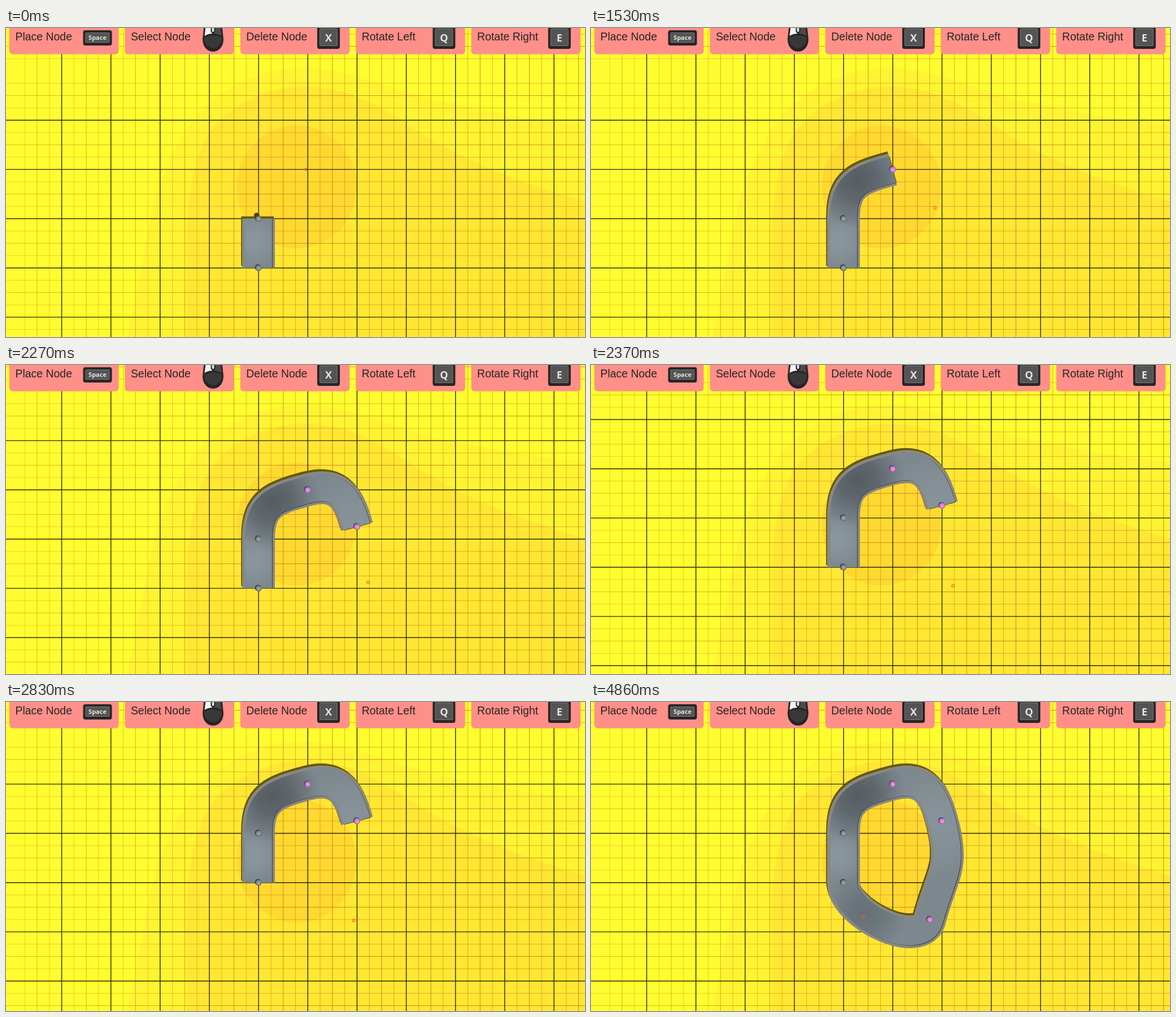
Recreate the animation shown at these times as an HTML page with a canvas. Size 1025 px wide and 547 px high, loop 5370 ms.

```html
<!DOCTYPE html>
<html>
<head>
<meta charset="utf-8">
<style>
html, body { margin: 0; width: 100%; height: 100%; overflow: hidden; background: #fffd2f; }
canvas { display: block; }
</style>
</head>
<body>
<canvas id="stage" width="1025" height="547"></canvas>
<script>
const ctx = document.getElementById('stage').getContext('2d');
const W = 1025, H = 547, LOOP = 5370, CELL = 87.15;

// [time, x, y]
const CURSOR = [
  [280, 531, 250], [740, 552, 269], [840, 556, 273], [1300, 599, 309], [1400, 605, 314],
  [1860, 619, 329], [2120, 631, 347], [2270, 641, 385], [2370, 641, 391], [2500, 635, 394],
  [2910, 611, 385], [3060, 607, 385], [3520, 555, 385], [3600, 543, 383], [3650, 532, 382],
  [3880, 482, 381.5], [4030, 481.5, 381], [4490, 482, 380.5]
];
const SCROLL = [[2170, 0], [2270, -29], [2420, -85], [2500, -99], [2640, -105]];

// Each node has a heading in degrees, a handle length and the time it appears
const NODES = [
  { x: 447, y: 424.7, angle: -90, pull: .35, at: 0 },
  { x: 447, y: 337.4, angle: -90, pull: .4, at: 0 },
  { x: 534, y: 250.3, angle: -15, pull: .5, at: 380, pink: true },
  { x: 621.3, y: 315.5, angle: 75, pull: .5, at: 1630, pink: true },
  { x: 599.7, y: 490, angle: 105, pull: .5, at: 2840, pink: true }
];
const CLOSE_AT = 4860;

function sample(keys, t) {
  const next = keys.findIndex(k => k[0] > t);
  if (next === 0) return keys[0].slice(1);
  if (next < 0) return keys[keys.length - 1].slice(1);
  const a = keys[next - 1], b = keys[next];
  const u = (t - a[0]) / (b[0] - a[0]);
  return a.slice(1).map((v, i) => v + (b[i + 1] - v) * u);
}

function circle(x, y, r, fill) {
  ctx.beginPath();
  ctx.arc(x, y, r, 0, 7);
  ctx.fillStyle = fill;
  ctx.fill();
}

function box(x, y, w, h, r, fill) {
  ctx.beginPath();
  ctx.roundRect(x, y, w, h, r);
  ctx.fillStyle = fill;
  ctx.fill();
}

function radial(x, y, r, rgb, alpha) {
  const g = ctx.createRadialGradient(x, y, 0, x, y, r);
  g.addColorStop(0, `rgba(${rgb},${alpha})`);
  g.addColorStop(.4, `rgba(${rgb},${alpha * .75})`);
  g.addColorStop(1, `rgba(${rgb},0)`);
  return g;
}

const outerGlow = new Path2D(`M215 547C232 470 246 380 262 310C280 250 300 205 330 165
  C370 115 440 70 530 70C600 72 680 108 760 128C850 148 930 162 1025 172V547Z`);
const innerGlow = new Path2D(`M320 547V365C322 290 335 225 360 185C400 130 470 104 530 104
  C610 104 670 143 720 177C790 222 880 265 1025 307V547Z`);

function background() {
  ctx.fillStyle = '#fffd2f';
  ctx.fillRect(0, 0, W, H);
  ctx.fillStyle = '#fff431';
  ctx.fill(outerGlow);
  ctx.fillStyle = '#ffe732';
  ctx.fill(innerGlow);
  ctx.beginPath();
  ctx.ellipse(514.5, 281.5, 106, 109, 0, 0, 7);
  ctx.fillStyle = '#ffd92f';
  ctx.fill();
}

function lines(step, skip, scroll, style, width) {
  ctx.beginPath();
  const draw = (origin, limit, vertical) => {
    for (let i = -8; i < 60; i++) {
      if (i % skip === 0) continue;
      const p = origin + i * step;
      if (p < 0 || p > limit) continue;
      ctx.moveTo(vertical ? p : 0, vertical ? 0 : p);
      ctx.lineTo(vertical ? p : W, vertical ? H : p);
    }
  };
  draw(11.4, W, true);
  draw(76.1 + scroll % CELL, H, false);
  ctx.strokeStyle = style;
  ctx.lineWidth = width;
  ctx.stroke();
}

function fade(from, to) {
  const g = ctx.createLinearGradient(0, 0, 600, 0);
  g.addColorStop(0, `rgba(190,85,10,${from})`);
  g.addColorStop(1, `rgba(170,80,10,${to})`);
  return g;
}

function grid(scroll) {
  lines(CELL / 4, 2, scroll, fade(.26, .4), 1);
  lines(CELL / 2, 2, scroll, fade(.4, .62), 1);
  lines(CELL, Infinity, scroll, '#2b2a14', 1.4);
}

function trackPath(nodes, closed) {
  const path = new Path2D();
  path.moveTo(nodes[0].x, nodes[0].y);
  const join = (a, b) => {
    const h = Math.hypot(b.x - a.x, b.y - a.y) * b.pull;
    const p = a.angle * Math.PI / 180, q = b.angle * Math.PI / 180;
    path.bezierCurveTo(a.x + h * Math.cos(p), a.y + h * Math.sin(p),
      b.x - h * Math.cos(q), b.y - h * Math.sin(q), b.x, b.y);
  };
  for (let i = 1; i < nodes.length; i++) join(nodes[i - 1], nodes[i]);
  if (closed) {
    join(nodes[nodes.length - 1], nodes[0]);
    path.closePath();
  }
  return path;
}

function track(nodes, closed) {
  const path = trackPath(nodes, closed);
  const layer = (style, width, dx = 0, dy = 0) => {
    ctx.save();
    ctx.translate(dx, dy);
    ctx.strokeStyle = style;
    ctx.lineWidth = width;
    ctx.stroke(path);
    ctx.restore();
  };
  layer('#625a0c', 58, -1.8, -3.8);
  layer('#8a8782', 58);
  layer('#35383a', 48, .9, .6);
  layer('#7d888e', 48);
  if (nodes.length > 2) layer(radial(472, 270, 85, '78,84,90', .85), 48);
  if (closed) layer(radial(485, 480, 75, '92,101,108', .7), 48);
  layer(radial(437, 377, 48, '146,161,166', .6), 48);
  layer(radial(612, 320, 100, '143,157,163', .55), 48);
}

function node({ x, y, pink }) {
  circle(x - .9, y - .8, 5.6, pink ? '#563f5b' : '#3d4143');
  const g = ctx.createRadialGradient(x + 1, y + 1.5, 0, x, y, 5.5);
  g.addColorStop(0, pink ? '#ee9ced' : '#a5abad');
  g.addColorStop(.6, pink ? '#d783d9' : '#888e91');
  g.addColorStop(1, pink ? '#995d9f' : '#5d6366');
  circle(x + .3, y + .3, 5.3, g);
}

function label(text, x, y, font, fill, align) {
  ctx.font = font;
  ctx.fillStyle = fill;
  ctx.textAlign = align;
  ctx.fillText(text, x, y);
}

function key(text, x, y, w, h, font, baseline) {
  box(x, y, w, h, 4, '#262626');
  box(x + 4, y + 4, w - 8, h - 9, 2, '#777');
  box(x + 5, y + 5, w - 10, h - 11, 1.5, '#545454');
  label(text, x + w / 2, baseline, font, '#e4e4e4', 'center');
}

function mouse(x) {
  ctx.fillStyle = '#252525';
  ctx.fill(new Path2D(`M${x - 16} -4L${x - 18.5} 20C${x - 18} 49 ${x + 18} 49 ${x + 18.5} 20L${x + 16} -4Z`));
  ctx.fillStyle = '#383838';
  ctx.fill(new Path2D(`M${x - 16} 17Q${x} 9 ${x + 16} 17C${x + 15} 42 ${x - 15} 42 ${x - 16} 17Z`));
  ctx.fillStyle = '#f4f4f4';
  ctx.fill(new Path2D(`M${x - 13} -2L${x - 15} 14Q${x - 8} 10 ${x - 1.5} 10V-2Z`));
  ctx.fillStyle = '#4b4b4b';
  ctx.fill(new Path2D(`M${x + 13} -2L${x + 15} 14Q${x + 8} 10 ${x + 1.5} 10V-2Z`));
  box(x - 4, -4, 8, 13, 4, '#252525');
  box(x - 2, -4, 4, 11, 2, '#dedede');
}

function toolbar() {
  ['Place Node', 'Select Node', 'Delete Node', 'Rotate Left', 'Rotate Right'].forEach((text, i) => {
    const x = 6 + i * 204.4;
    box(x, -10, 193.5, 56.5, 6, '#ff8f89');
    label(text, x + 10.5, 21.7, '19.45px "Liberation Sans", Arial, sans-serif', '#292627', 'left');
    if (i === 0) key('Space', 136.5, 4, 51, 27, 'bold 11px "Open Sans", sans-serif', 21);
    else if (i === 1) mouse(366.5);
    else key(' XQE'[i - 1], x + 136.2, -3, 40, 40, 'bold 18px "Open Sans", sans-serif', 24);
  });
}

function frame() {
  const t = performance.now() % LOOP;
  const [scroll] = sample(SCROLL, t);
  const [cx, cy] = sample(CURSOR, t);
  const nodes = NODES.filter(n => t >= n.at);

  background();
  grid(scroll);
  ctx.save();
  ctx.translate(0, scroll);
  if (nodes.length === 2) circle(443.8, 332, 5, '#4b4718');
  track(nodes, t >= CLOSE_AT);
  nodes.forEach(node);
  ctx.restore();

  ctx.beginPath();
  ctx.arc(cx, cy, t < 280 ? 2 : 2.4, 0, 7);
  ctx.strokeStyle = '#ff5a30';
  ctx.lineWidth = 1.1;
  ctx.stroke();
  toolbar();
  requestAnimationFrame(frame);
}
frame();
</script>
</body>
</html>
```
